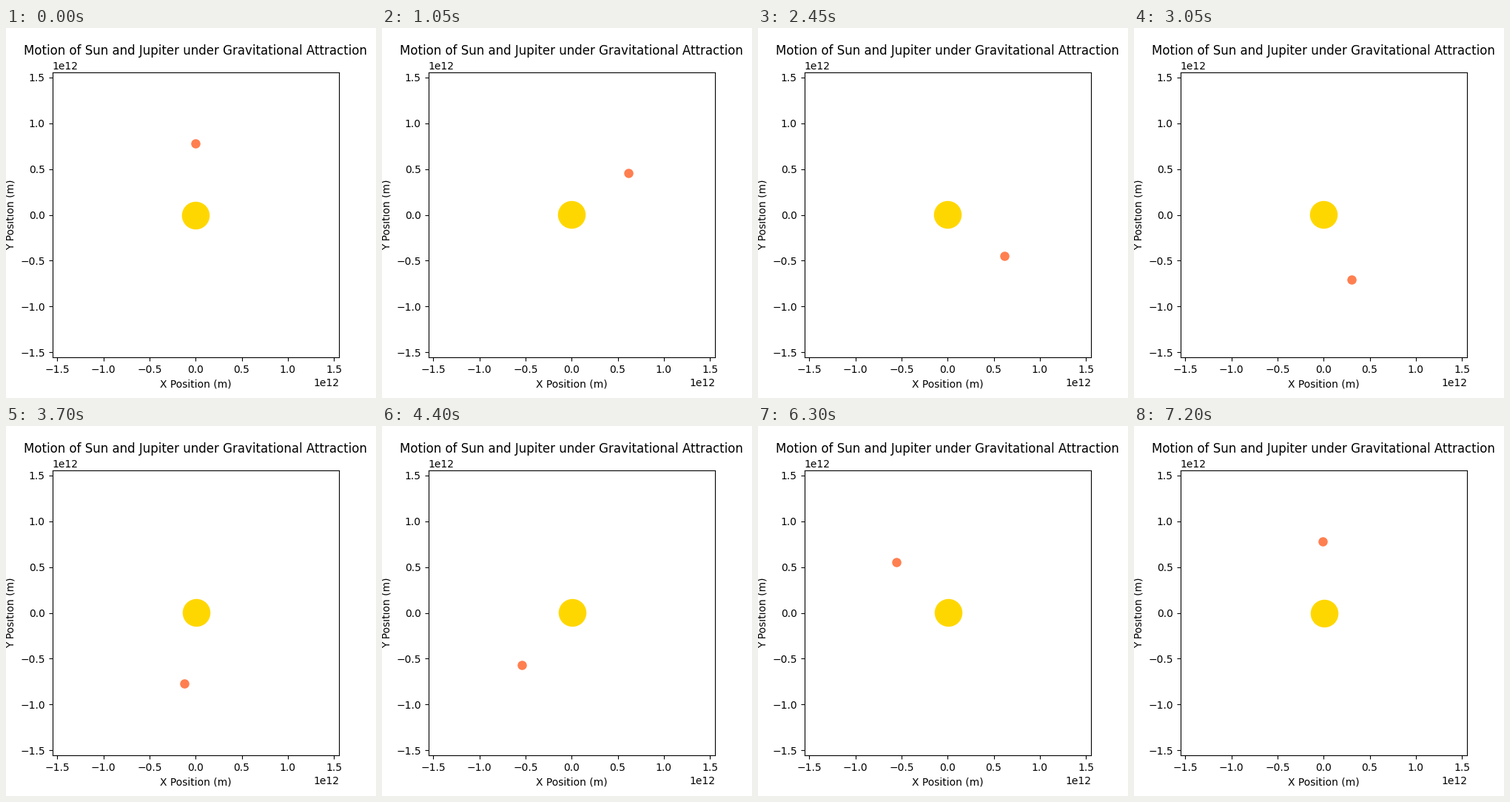
These frames come from a looping animation (500 px wide and 500 px high, 7250 ms). A matplotlib script:

```python
import numpy as np
import matplotlib.pyplot as plt
from matplotlib.animation import FuncAnimation

G = 6.674e-11
M_SUN, M_JUP = 1.989e30, 1.898e27
DIST, SPEED = 7.78e11, 13.07e3
DT = 30 * 86400
FRAMES, INTERVAL = 145, 50


def simulate():
    """Semi-implicit Euler orbit of both bodies, one step per frame."""
    pos = np.array([[0.0, 0.0], [0.0, DIST]])
    vel = np.array([[0.0, 0.0], [SPEED, 0.0]])
    track = [pos.copy()]
    for _ in range(FRAMES - 1):
        gap = pos[1] - pos[0]
        pull = G * gap / np.linalg.norm(gap) ** 3
        vel += DT * np.array([M_JUP * pull, -M_SUN * pull])
        pos += DT * vel
        track.append(pos.copy())
    return track


track = simulate()

fig, ax = plt.subplots(figsize=(5, 5), dpi=100)
ax.set_xlim(-2 * DIST, 2 * DIST)
ax.set_ylim(-2 * DIST, 2 * DIST)
ax.set_xlabel("X Position (m)")
ax.set_ylabel("Y Position (m)")
ax.set_title("Motion of Sun and Jupiter under Gravitational Attraction")

sun, = ax.plot([], [], "o", color="gold", markersize=26)
jupiter, = ax.plot([], [], "o", color="coral", markersize=8)


def update(i):
    for body, (x, y) in zip((sun, jupiter), track[i]):
        body.set_data([x], [y])
    return sun, jupiter


anim = FuncAnimation(fig, update, frames=FRAMES, interval=INTERVAL,
                     repeat=True, repeat_delay=0)
plt.show()
```
